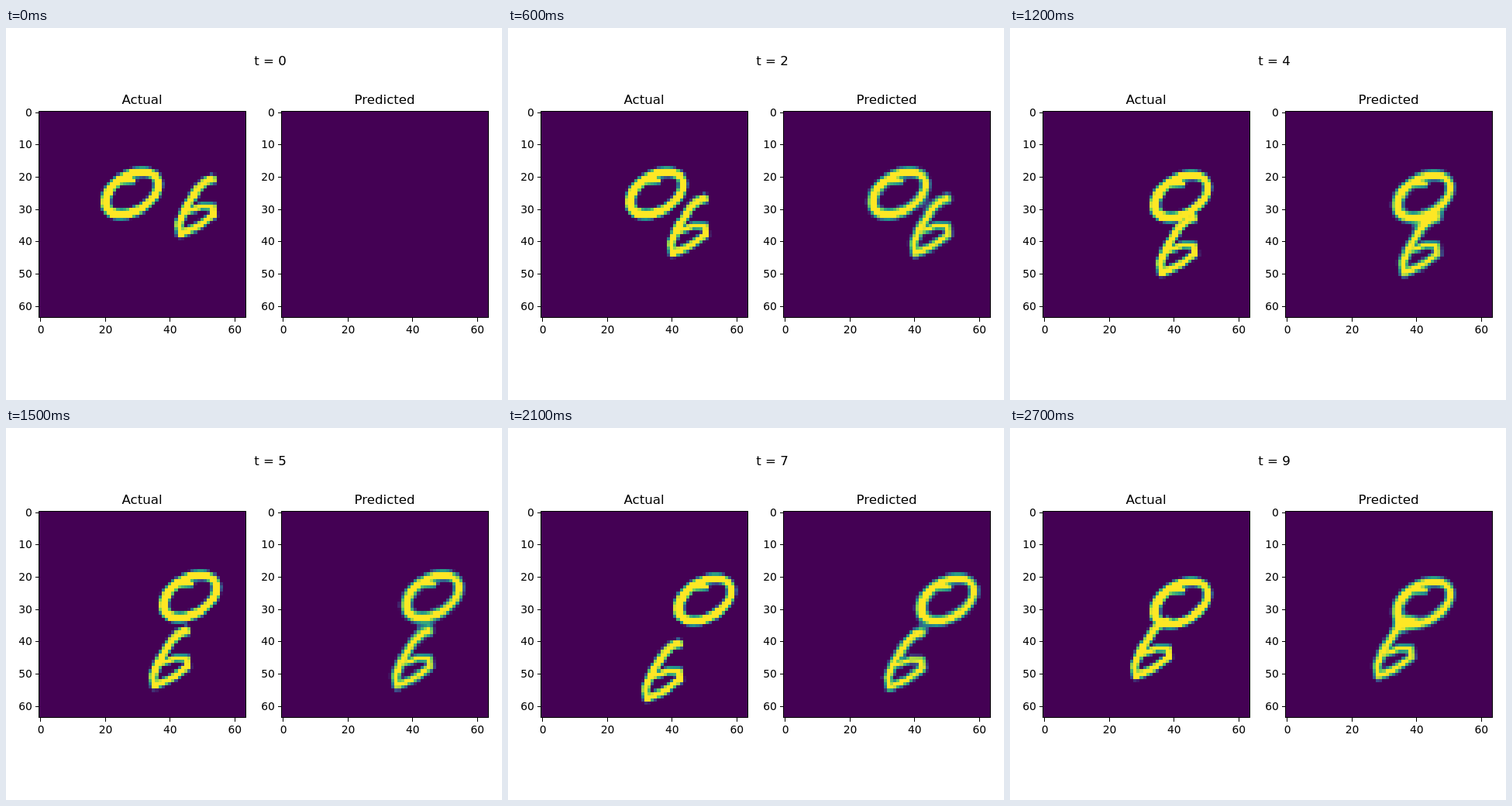
An HTML page with a canvas that plays this animation: 640 px wide and 480 px high, repeating every 3000 ms.

```html
<!DOCTYPE html>
<html lang="en">
<head>
<meta charset="utf-8">
<title>Actual and predicted digits</title>
<style>
html, body { margin: 0; width: 100%; height: 100%; overflow: hidden; background: #fff; }
canvas, svg { position: absolute; left: 0; top: 0; }
text { font: 13.89px "DejaVu Sans", sans-serif; }
.title { font-size: 16.67px; text-anchor: middle; }
.axis { fill: none; stroke: #000; stroke-width: 1; shape-rendering: crispEdges; }
</style>
</head>
<body>
<canvas id="cells" width="640" height="480"></canvas>
<svg id="axes" width="640" height="480">
  <text class="title" id="clock" x="341" y="48"></text>
</svg>
<script>
const SIZE = 64, CELL = 4.167, TOP = 107.2, STEP = 300, STEPS = 10;
const PANELS = [["Actual", 42.4], ["Predicted", 355.4]];
const ctx = document.getElementById("cells").getContext("2d");
const axes = document.getElementById("axes");
const clock = document.getElementById("clock");

// Strokes are lists of [x, y, half width] in grid units.
const RING = Array.from({ length: 33 }, (_, i) => {
  const a = i * Math.PI / 16;
  return [28.8 + 8.2 * Math.cos(a), 25.4 + 6.6 * Math.sin(a - 0.42), 1.45 - 0.15 * Math.cos(a)];
});
const HOOK = [[26, 21.6, 1.1], [29, 21.4, 1.1]];
const SIX = [
  [53.6, 21.1], [51.7, 21.7], [49.1, 24.2], [45.3, 30.2], [43.3, 35], [43.9, 38],
  [48.9, 35.9], [54, 32.2], [53.8, 29.6], [50.3, 29.5], [46.5, 30.9]
].map(([x, y], i) => [x, y, 1.4 - 0.04 * i]);

// Positive inside the ink, falling by one per grid unit.
function depth(x, y, pts) {
  let best = -Infinity;
  for (let i = 1; i < pts.length; i++) {
    const [px, py, pw] = pts[i - 1], [qx, qy, qw] = pts[i];
    const bx = qx - px, by = qy - py;
    const k = Math.max(0, Math.min(1, ((x - px) * bx + (y - py) * by) / (bx * bx + by * by)));
    best = Math.max(best, pw + k * (qw - pw) - Math.hypot(x - px - k * bx, y - py - k * by));
  }
  return best;
}

// Larger of two depths; nearby shapes melt together over the given reach.
function join(a, b, reach) {
  const h = Math.max(0, reach - Math.abs(a - b));
  return Math.max(a, b) + (reach && h * h / (4 * reach));
}

const RAMP = [[68, 1, 84], [59, 82, 139], [33, 145, 140], [94, 201, 98], [253, 231, 37]];
function color(v) {
  const i = Math.min(3, Math.floor(v * 4)), k = v * 4 - i;
  return `rgb(${RAMP[i].map((c, j) => Math.round(c + (RAMP[i + 1][j] - c) * k))})`;
}

const bounce = (v, limit) => limit - Math.abs(limit - v);

function drawPanel(t, left, predicted) {
  const zx = Math.round(bounce(3.6 * t, 23.4)), zy = Math.floor(t / 3);
  const sx = Math.round(-1.6 * t - 0.2);
  let sy = Math.round(bounce(3.1 * t, 20.62));
  // The prediction turns early, is softer, and blends touching digits.
  if (predicted) sy = Math.min(sy, 16.5);
  const soft = predicted ? 1.4 : 1, reach = predicted ? 3 : 0;
  const edge = (start, i) => Math.round(start + i * CELL);

  for (let r = 0; r < SIZE; r++) {
    for (let c = 0; c < SIZE; c++) {
      let v = 0;
      if (t || !predicted) {
        const x = c + 0.5, y = r + 0.5;
        const zero = Math.max(depth(x - zx, y - zy, RING), depth(x - zx, y - zy, HOOK));
        const six = depth(x - sx, y - sy, SIX);
        v = Math.max(0, Math.min(1, join(zero, six, reach) / soft + 0.5));
      }
      const px = edge(left, c), py = edge(TOP, r);
      ctx.fillStyle = color(v);
      ctx.fillRect(px, py, edge(left, c + 1) - px, edge(TOP, r + 1) - py);
    }
  }
}

function add(tag, attrs, text = "") {
  const el = document.createElementNS("http://www.w3.org/2000/svg", tag);
  for (const name in attrs) el.setAttribute(name, attrs[name]);
  el.textContent = text;
  axes.append(el);
}

for (const [name, left] of PANELS) {
  const x0 = Math.floor(left) + 0.5, y0 = 107.5, x1 = x0 + 267, y1 = 373.5;
  let path = `M${x0} ${y0}H${x1}V${y1}H${x0}Z`;
  for (let v = 0; v <= 60; v += 10) {
    const offset = (v + 0.5) * CELL;
    const y = Math.floor(TOP + offset) + 0.5;
    path += `M${x0} ${y}h-5`;
    add("text", { x: left - 8.6, y: y + 4.5, "text-anchor": "end" }, v);
    if (v % 20) continue;
    const x = Math.round(left + offset) + 0.5;
    path += `M${x} ${y1}v5`;
    add("text", { x: left + offset + 0.7, y: 394, "text-anchor": "middle" }, v);
  }
  add("path", { d: path, class: "axis" });
  add("text", { x: left + 133.2, y: 98, class: "title" }, name);
}

let shown = -1;
const begin = performance.now();
function tick() {
  const t = Math.floor((performance.now() - begin) / STEP) % STEPS;
  if (t !== shown) {
    shown = t;
    clock.textContent = "t = " + t;
    PANELS.forEach(([, left], i) => drawPanel(t, left, i === 1));
  }
  requestAnimationFrame(tick);
}
tick();
</script>
</body>
</html>
```
